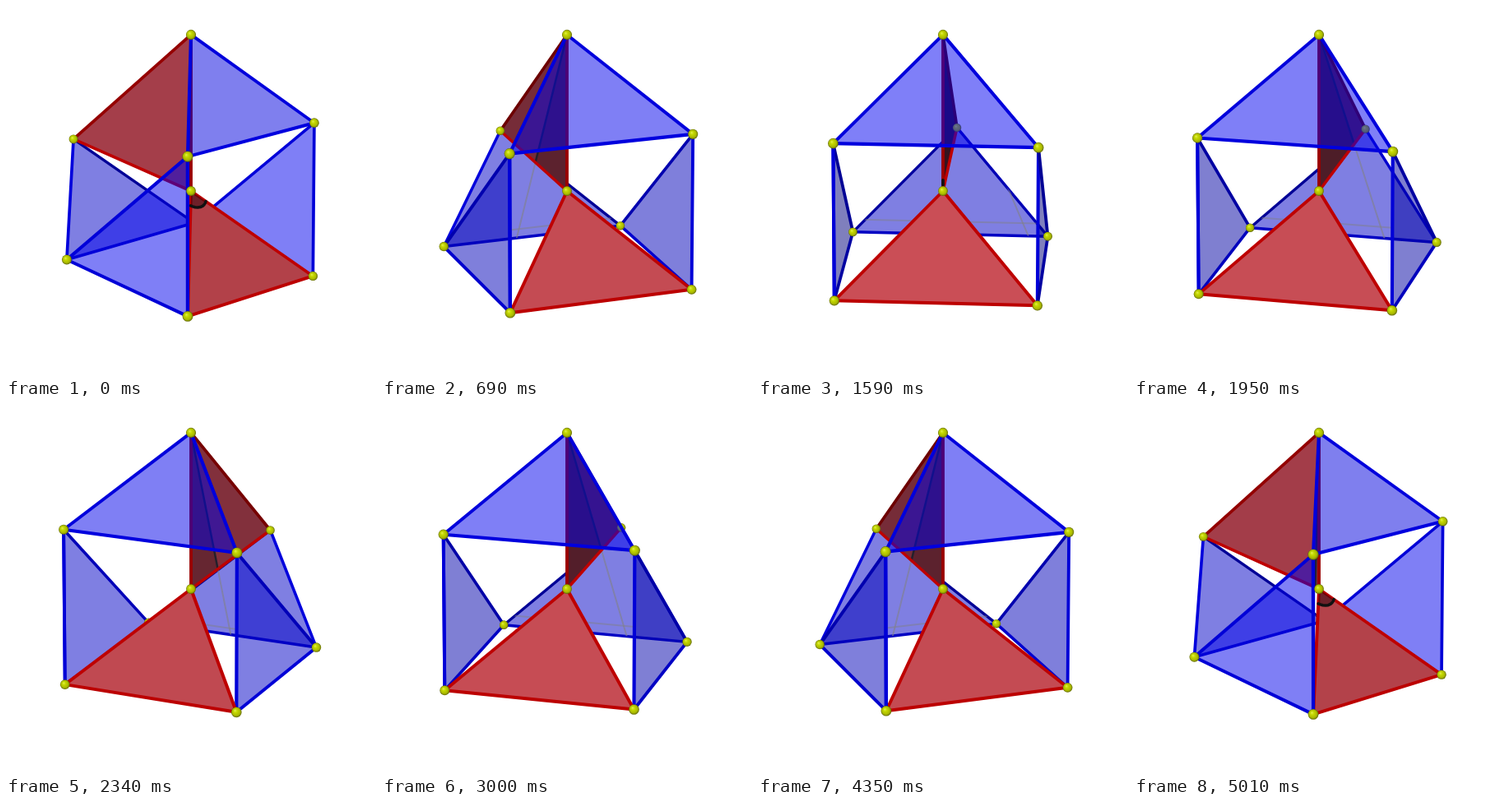
These frames come from a looping animation (450 px wide and 450 px high, 5040 ms). An HTML page with a canvas:

```html
<!DOCTYPE html>
<html>
<head>
<meta charset="utf-8">
<style>
html, body { margin: 0; width: 100%; height: 100%; overflow: hidden; background: #fff; }
canvas { display: block; }
</style>
</head>
<body>
<canvas id="stage" width="450" height="450"></canvas>
<script>
const g = document.getElementById('stage').getContext('2d');
const RAD = Math.PI / 180, UNIT = 193.1, TILT = 13.1 * RAD, PERSP = 0.00024;
const CT = Math.cos(TILT), ST = Math.sin(TILT);
const HALF = Math.acos(-0.25) / 2;   // half the azimuth between E and F

const polar = (radius, az, z) => [radius * Math.sin(az), radius * Math.cos(az), z];
const add = (a, b) => a.map((v, i) => v + b[i]);
const mix = (a, b, k) => a.map((v, i) => v + (b[i] - v) * k);
const clamp = (v, lo, hi) => Math.max(lo, Math.min(hi, v));
const blue = v => `rgb(0,0,${Math.round(v)})`;
const red = v => `rgb(${Math.round(v)},0,0)`;

function project(p) {
  const [x, y, z] = p.map(v => v * UNIT);
  const depth = y * CT + z * ST, d = 1 - PERSP * depth;
  return [225 + x / d, 225 - (z * CT - y * ST) / d, depth];
}

function path(points) {
  g.beginPath();
  points.forEach(p => g.lineTo(p[0], p[1]));
}

function line(a, b, color, width) {
  path([a, b]);
  g.strokeStyle = color;
  g.lineWidth = width || clamp(3.8 + (a[2] + b[2]) * 0.0015, 3.2, 4.2);
  g.stroke();
}

function face(tri, fill, edges) {
  path(tri);
  g.fillStyle = fill;
  g.fill();
  edges.forEach((c, i) => line(tri[i], tri[(i + 1) % 3], c));
}

function clipped(tri, draw) {
  g.save();
  path(tri);
  g.closePath();
  g.clip();
  draw();
  g.restore();
}

function ball([x, y, depth]) {
  const r = 5.9 + depth * 0.004;
  const s = g.createRadialGradient(x - r * 0.3, y - r * 0.35, 0, x, y, r);
  s.addColorStop(0, '#e4f050');
  s.addColorStop(0.35, '#c4d800');
  s.addColorStop(0.75, '#a9b800');
  s.addColorStop(1, '#606800');
  g.fillStyle = s;
  g.beginPath();
  g.arc(x, y, r, 0, 7);
  g.fill();
}

// Circular sector at the origin between two unit vectors
function sector(u, v, size) {
  const pts = [];
  for (let i = 0; i <= 8; i++) {
    const m = mix(u, v, i / 8);
    pts.push(project(m.map(c => c * size / Math.hypot(...m))));
  }
  path([project([0, 0, 0]), ...pts]);
  g.fillStyle = 'rgba(40,0,10,.5)';
  g.fill();
  path(pts);
  g.strokeStyle = '#111';
  g.lineWidth = 3.5;
  g.stroke();
}

function render(deg) {
  const turn = deg * RAD;
  const o = [0, 0, 0], t = [0, 0, 1];
  const u = polar(Math.sqrt(0.96), turn + Math.PI, 0.2);
  const e = polar(0.8, turn - HALF, -0.6), f = polar(0.8, turn + HALF, -0.6);
  const [O, T, U, E, F, A, B, G, H] =
    [o, t, u, e, f, add(e, t), add(f, t), add(e, u), add(f, u)].map(project);

  const side = CT * Math.abs(Math.sin(turn));
  const front = 0.754 * Math.cos(turn) + 0.143;
  const slant = Math.sqrt(1 - ((u[1] * CT - 0.8 * ST) ** 2) / 1.6);
  const glass = v => `rgba(0,0,${Math.round(v)},.5)`;
  const back = [U, G, H], wall = [T, O, U];
  const guides = [mix(A, E, 0.7), mix(B, F, 0.7)];

  g.fillStyle = '#fff';
  g.fillRect(0, 0, 450, 450);
  g.lineCap = g.lineJoin = 'round';

  // Rear triangle
  face(back, glass(198), [
    blue(clamp(170 + 2 * deg, 150, 220)), blue(195),
    blue(clamp(170 - 2 * deg, 150, 220))]);
  clipped(back, () => {
    guides.forEach(p => line(T, p, 'rgba(128,128,135,.6)', 2));
    line(mix(A, E, 0.48), mix(B, F, 0.48), 'rgba(128,128,135,.5)', 2);
  });

  // Red triangle through the axis
  const wg = Math.round(20 + 55 * side);
  face(wall, `rgb(${Math.round(55 + 145 * side)},${wg},${wg + 12})`, []);
  clipped(wall, () => guides.forEach(p => {
    path([T, p, O]);
    g.fillStyle = 'rgba(0,0,10,.22)';
    g.fill();
    line(T, p, '#23202c', 2.5);
  }));
  line(T, O, red(155));
  line(T, U, red(190 * slant));
  line(O, U, red(190));
  ball(U);
  if (Math.abs(deg) < 10) line(project([0, 0, 0.04]), project([0, 0, 0.07]), '#111');

  // Side triangles
  const low = blue(150 + 65 * Math.min(1, 2 * side)), long = blue(60 + 200 * slant);
  const sideFill = glass(110 + 130 * Math.min(1, side * 1.3));
  face([A, E, G], sideFill, [blue(215), low, long]);
  face([B, F, H], sideFill, [blue(215), low, long]);
  ball(G);
  ball(H);

  // Lower red triangle
  const fg = Math.round(37 + 46 * front);
  face([O, E, F], `rgb(${Math.round(122 + 90 * front)},${fg},${fg + 8})`,
    [red(190), red(188), red(190)]);
  if (deg > 38) sector(e, f, 0.12);
  line(A, E, blue(215));

  // Upper blue triangle
  face([T, A, B], glass(175 + 75 * front), [blue(220), blue(222), blue(220)]);
  [O, T, B, F, A, E].forEach(ball);
}

function tick(now) {
  const n = Math.floor(now / 30) % 168;
  render(50.8 - 1.06 * Math.min(n, 168 - n));
  requestAnimationFrame(tick);
}
requestAnimationFrame(tick);
</script>
</body>
</html>
```
